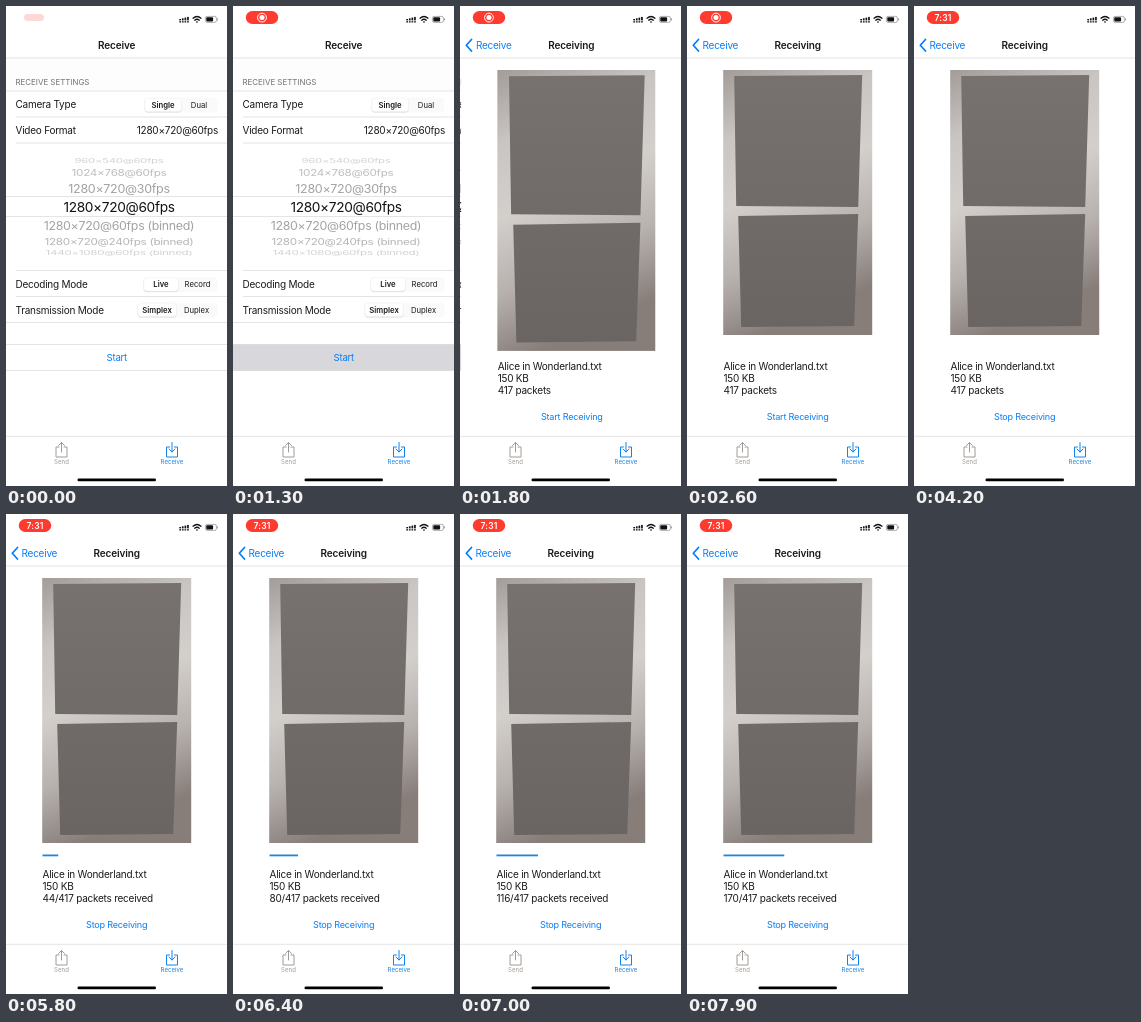
An HTML page that plays this animation: 221x480 px, repeating every 8000 ms.

```html
<!DOCTYPE html>
<html lang="en">
<head>
<meta charset="utf-8">
<title>Receive</title>
<style>
html, body { margin: 0; width: 100%; height: 100%; overflow: hidden; background: #fff; }
svg { display: block; width: 100%; height: 100%; }
text { font: 10px Inter, Roboto, sans-serif; letter-spacing: -.024em; fill: #1a1a1a; }
.blue { fill: #0a7ef5; }
.line { stroke: #d2d2d5; stroke-width: .6; }
.icon { fill: none; stroke-width: 1; stroke-linejoin: round; stroke-linecap: round; }
</style>
</head>
<body>
<svg viewBox="0 0 221 480">
  <defs>
    <linearGradient id="paper" x1="0" y1="0" x2="0.25" y2="1">
      <stop offset="0" stop-color="#a39c99"/>
      <stop offset=".25" stop-color="#c9c5c3"/>
      <stop offset=".5" stop-color="#d3cfcb"/>
      <stop offset=".75" stop-color="#b8b2af"/>
      <stop offset="1" stop-color="#877e7a"/>
    </linearGradient>
    <linearGradient id="tone" x1="0" y1="0" x2="0" y2="1">
      <stop offset="0" stop-color="#77726f"/>
      <stop offset="1" stop-color="#6a6462"/>
    </linearGradient>
  </defs>
  <rect width="221" height="480" fill="#fff"/>
  <g id="settings"></g>
  <g id="receiver"></g>
  <g id="bars"></g>
</svg>
<script>
const $ = id => document.getElementById(id);
const clamp = v => Math.max(0, Math.min(1, v));
const text = (x, y, s, attrs = '', style = '') =>
  `<text x="${x}" y="${y}" ${attrs} style="${style}">${s}</text>`;
const mid = (x, y, s, attrs = '', style = '') =>
  text(x, y, s, 'text-anchor="middle" ' + attrs, style);
const line = (y, x = 0) => `<path class="line" d="M${x} ${y}H221"/>`;
const rect = (x, y, w, h, fill, attrs = '') =>
  `<rect x="${x}" y="${y}" width="${w}" height="${h}" fill="${fill}" ${attrs}/>`;

// Segmented control; the left option is selected
function segment(x, y, split, left, right) {
  const small = 'font-size:7.7px;letter-spacing:0';
  return rect(x, y, 211.5 - x, 15, '#fafafa', 'rx="4"') +
    rect(x + .6, y + 1.2, split - x, 14, '#e3e3e5', 'rx="3.6"') +
    rect(x + .8, y + .7, split - x - .4, 13.4, '#fff', 'rx="3.5" stroke="#ececee" stroke-width=".4"') +
    mid((x + split) / 2 + .5, y + 10.2, left, '', small + ';font-weight:600') +
    mid((split + 211) / 2, y + 10.2, right, '', small);
}

// Picker row on a cylinder: centre y, size, vertical squash, grey
function wheelRow([y, size, squash, color, s]) {
  return `<g transform="translate(113 ${y}) scale(1 ${squash})">` +
    mid(0, size * .36, s, '', `font-size:${size}px;fill:${color}`) + '</g>';
}

const wheel = [
  [155, 11.4, .5, '#d2d2d2', '960×540@60fps'],
  [166.5, 11.7, .76, '#bdbdbd', '1024×768@60fps'],
  [182.5, 12.5, .92, '#a2a2a2', '1280×720@30fps'],
  [201, 13.7, 1, '#111', '1280×720@60fps'],
  [219.5, 12.4, .92, '#a2a2a2', '1280×720@60fps (binned)'],
  [235.5, 11.7, .76, '#b5b5b5', '1280×720@240fps (binned)'],
  [246.5, 11.6, .5, '#d2d2d2', '1440×1080@60fps (binned)']
];

$('settings').innerHTML =
  rect(0, 52, 221, 33, '#fdfdfd') +
  text(9.5, 79, 'RECEIVE SETTINGS', '', 'font-size:7.9px;letter-spacing:0;fill:#707074') +
  line(85) + text(9.5, 102, 'Camera Type') + segment(138, 91.5, 175, 'Single', 'Dual') +
  line(111, 10) + text(9.5, 128, 'Video Format') +
  text(212, 128, '1280×720@60fps', 'text-anchor="end"') + line(137, 10) +
  wheel.map(wheelRow).join('') + line(190.5) + line(210.5) +
  line(264.5, 10) + text(9.5, 281.5, 'Decoding Mode') + segment(137, 271, 172, 'Live', 'Record') +
  line(290.5, 10) + text(9.5, 307.5, 'Transmission Mode') + segment(131, 296.5, 170, 'Simplex', 'Duplex') +
  line(316.5) + rect(0, 338.5, 221, 26, '#d8d8dc', 'id="press" opacity="0"') +
  line(338.5) + mid(110.8, 354.5, 'Start', 'class="blue"', 'font-size:9.6px') + line(364.5);

$('receiver').innerHTML =
  rect(0, 52, 221, 378, '#fff') +
  '<g id="photo">' +
  rect(0, 0, 149, 265, 'url(#paper)') +
  '<path fill="url(#tone)" d="M11 6L139 5L135 137L13 136ZM15 146L135 144L131 256L18 257Z"/></g>' +
  rect(36.5, 340.5, 0, 1.8, '#2384df', 'id="progress"') +
  text(36.5, 363.5, 'Alice in Wonderland.txt') +
  text(36.5, 375.5, '150 KB') +
  text(36.5, 387.5, '', 'id="packets"') +
  mid(110.7, 413.6, '', 'id="action" class="blue"', 'font-size:9.1px');

// Tray with an arrow: up to send, down to receive
const tray = (x, color, head, label) =>
  `<path class="icon" stroke="${color}" transform="translate(${x} 436)"
    d="M-2.5 5H-5.5V15H5.5V5H2.5M0 .5V10M-3 ${head}"/>` +
  mid(x, 458, label, '', `font-size:6px;letter-spacing:.01em;fill:${color}`);

// Dual signal: rising bars above a row of dots
const signal = [0, 1, 2, 3].map(i =>
  rect(173.3 + i * 2.6, 13 - i * .7, 1.7, 1.4 + i * .7, '#111') +
  rect(173.3 + i * 2.6, 15.2, 1.7, 1.3, '#111')).join('');

$('bars').innerHTML =
  rect(0, 0, 221, 52, '#fff') + line(52) +
  mid(0, 42.8, 'Receive', 'id="oldTitle"', 'font-weight:600;letter-spacing:-.015em') +
  mid(0, 42.8, 'Receiving', 'id="newTitle"', 'font-weight:600;letter-spacing:-.015em') +
  '<g id="back"><path class="icon" stroke="#007aff" style="stroke-width:1.7" d="M11.5 33.5L6.3 39.3L11.5 45"/>' +
  text(15.5, 42.8, 'Receive', 'class="blue" id="backText"') + '</g>' +
  rect(0, 0, 0, 0, '#ff3b30', 'id="pill"') +
  '<g id="rec"><circle cx="29" cy="11.6" r="4.4" fill="none" stroke="#fff"/><circle cx="29" cy="11.6" r="2.5" fill="#fff"/></g>' +
  mid(29, 14.7, '7:31', 'id="clock"', 'font-size:8.5px;font-weight:600;letter-spacing:.02em;fill:#fff') +
  signal +
  '<path class="icon" stroke="#111" style="stroke-width:1.3" d="M187 12.2Q191 8.8 195 12.2M188.7 14.2Q191 12.3 193.3 14.2M190.8 16H191.2"/>' +
  rect(199.4, 10.4, 11, 6, 'none', 'rx="1.7" stroke="#777" stroke-width=".6"') +
  rect(200.3, 11.3, 6.8, 4.2, '#111', 'rx=".9"') + rect(211.1, 12.4, .8, 2, '#888') +
  rect(0, 430, 221, 50, '#fff') + line(430.3) +
  tray(55.5, '#a09a96', '3.5L0 .5L3 3.5', 'Send') +
  tray(166, '#1482e8', '7L0 10L3 7', 'Receive') +
  rect(71.5, 472.6, 78.5, 2.7, '#000', 'rx="1.3"');

function set(id, attrs) {
  for (const k in attrs) $(id).setAttribute(k, attrs[k]);
}

function draw(t) {
  // Push with a critically damped spring
  const w = Math.max(0, t - 1400) * .0185;
  const p = t >= 1900 ? 1 : 1 - (1 + w) * Math.exp(-w);
  set('settings', { transform: `translate(${-66 * p} 0)`, visibility: p < 1 ? 'visible' : 'hidden' });
  set('receiver', { transform: `translate(${221 * (1 - p)} 0)` });
  set('press', { opacity: t >= 1200 ? 1 : 0 });
  set('oldTitle', { x: 110.7 - 78 * p, opacity: clamp(1 - p * 1.6) });
  set('newTitle', { x: 110.7 + 110 * (1 - p), opacity: clamp(p * 1.5 - .5) });
  set('back', { opacity: clamp(p * 1.6 - .6) });
  set('backText', { x: 15.5 + 78 * (1 - p) });

  // Recording indicator
  const grow = clamp(t / 300), pw = 20 + 12.5 * grow, ph = 7 + 6 * grow;
  const swap = clamp((t - 3200) / 300);
  set('pill', {
    x: 28 + grow - pw / 2, y: 11.5 - ph / 2, width: pw, height: ph, rx: ph / 2,
    opacity: .2 + .8 * grow
  });
  set('rec', { opacity: clamp((t - 200) / 200) * (1 - swap) });
  set('clock', { opacity: swap });

  set('photo', { transform: `translate(36.2 64) scale(${t < 1900 ? 1.06 : 1})` });
  const n = Math.max(0, Math.round((t - 5067) * .06));
  set('progress', { width: 149 * n / 417 });
  $('packets').textContent = n ? `${n}/417 packets received` : '417 packets';
  $('action').textContent = (t < 3900 ? 'Start' : 'Stop') + ' Receiving';
}

const start = performance.now();
function tick() {
  const t = (performance.now() - start) % 8000;
  draw(Math.floor(t / 100) * 100);
  requestAnimationFrame(tick);
}
tick();
</script>
</body>
</html>
```
